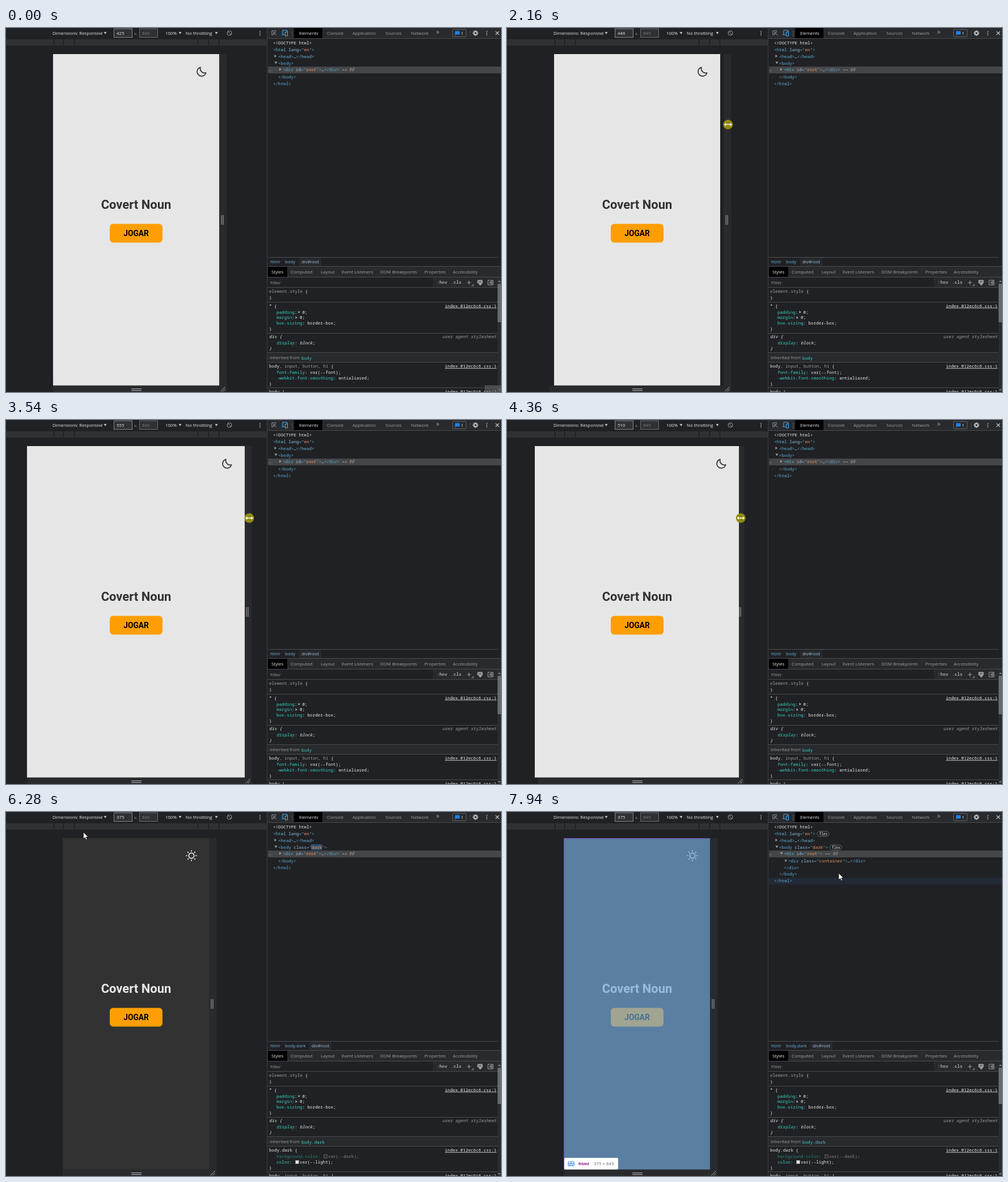
Write an HTML page that moves like this. It is 873 px wide and 642 px high and loops after 8 s.

```html
<!DOCTYPE html>
<html lang="en">
<head>
<meta charset="utf-8">
<title>Responsive preview</title>
<style>
html, body { margin: 0; width: 100%; height: 100%; overflow: hidden; background: #202124; }
svg { display: block; width: 873px; height: 642px; }
text { white-space: pre; font: 7.85px "Open Sans", sans-serif; fill: #e8eaed; }
.mono { font: 7.58px "Noto Sans Mono", monospace; }
.it { font-style: italic; }
.link { text-decoration: underline; text-anchor: end; }
.dim { fill: #9aa0a6; }
.title { font: 700 22px Roboto, sans-serif; text-anchor: middle; }
.play { font: 700 13.75px Roboto, sans-serif; text-anchor: middle; fill: #000; }
.line { fill: none; stroke: #9aa0a6; stroke-width: 1; }
.icon { fill: none; stroke-width: 20; stroke-linecap: round; stroke-linejoin: round; }
</style>
</head>
<body>
<svg id="stage" viewBox="0 0 873 642"></svg>
<script>
const COLORS = { t: '#5db0d7', n: '#9bbbdc', v: '#f29766', w: '#e8eaed', g: '#9aa0a6', p: '#35d4c7', d: '#81868a', c: '#24857e' };
const stage = document.getElementById('stage');
const esc = s => s.replace(/&/g, '&amp;').replace(/</g, '&lt;');
const rect = (x, y, w, h, fill, more = '') => `<rect x="${x}" y="${y}" width="${w}" height="${h}" fill="${fill}" ${more}/>`;
const path = (d, more = 'class="line"') => `<path d="${d}" ${more}/>`;
const text = (x, y, s, cls = '', more = '') => `<text x="${x}" y="${y + 2.8}" class="${cls}" ${more}>${esc(s)}</text>`;
const group = (id, body, more = '') => `<g id="${id}" ${more}>${body}</g>`;

// "~k" switches to the colour with key k
function code(x, y, marked, cls = '') {
  const parts = marked.split(/~(.)/);
  let spans = esc(parts[0]);
  for (let i = 1; i < parts.length; i += 2) spans += `<tspan fill="${COLORS[parts[i]]}">${esc(parts[i + 1])}</tspan>`;
  return `<text x="${x}" y="${y + 2.6}" class="mono ${cls}">${spans}</text>`;
}
const link = y => code(865, y, 'index.012ec6c6.css:1', 'link');
const down = (x, y, c = '#bdc1c6') => path(`M${x - 2.5} ${y - 2}h5l-2.5 4z`, `fill="${c}"`);
const right = (x, y, c = '#9aa0a6') => path(`M${x - 1.5} ${y - 2.5}v5l3.5-2.5z`, `fill="${c}"`);
const dots = (x, y) => [-3.2, 0, 3.2].map(d => `<circle cx="${x}" cy="${y + d}" r=".9" fill="#bdc1c6"/>`).join('');
const labels = (y, list, cls = 'dim') => list.map(([x, s]) => text(x, y, s, cls)).join('');

function emulatorBar() {
  return rect(0, 0, 461, 19, '#202124') + rect(0, 20, 460, 11, '#303134') +
    [84, 101, 120, 338, 357, 375].map(x => rect(x, 20, 1, 11, '#18191b')).join('') +
    labels(9.5, [[82, 'Dimensions: Responsive'], [281, '100%'], [317, 'No throttling']], '') +
    down(175, 9) + down(307, 9) + down(371, 9) +
    rect(190.5, 1.5, 32, 15, '#303134', 'stroke="#85888c"') + rect(235.5, 1.5, 32, 15, '#303134', 'stroke="#686b6e"') +
    text(195, 9.5, '425', '', 'id="size"') + text(226, 10, '×', 'dim') + text(240, 9.5, '849', '', 'style="fill:#777a7e"') +
    '<circle cx="394" cy="9" r="4" class="line"/>' + path('M391 6l6 6') + dots(448, 9);
}

function toolsBar() {
  const teeth = [0, 45, 90, 135].map(a => `<path d="M828 4.2v9.6" transform="rotate(${a} 828 9)" stroke="#bdc1c6" stroke-width="2"/>`).join('');
  return rect(461, 0, 412, 18, '#292a2d') + rect(508, 0, 50, 18, '#000') + rect(461, 18, 412, 1, '#494c50') +
    path('M476 6v-1h-7v7h2M472 8l5 5M472 8v4M472 8h4') +
    path('M488 12v-8h8v3M486.5 12h5M492.5 7h4v7h-4z', 'fill="none" stroke="#5db0f5"') +
    rect(504, 4, 1, 11, '#494c50') + text(517, 9.5, 'Elements') +
    labels(9.5, [[566, 'Console'], [611, 'Application'], [669, 'Sources'], [714, 'Network']]) +
    text(758.5, 8.5, '»', 'dim', 'style="font-size:12px"') +
    rect(787.5, 2.5, 24, 13, 'none', 'stroke="#5f6368" rx="1"') + path('M792 5.5h8v6h-6l-2 2z', 'fill="#1a82e8"') + text(802, 9.3, '1') +
    rect(818, 4, 1, 11, '#494c50') + teeth + '<circle cx="828" cy="9" r="2.6" fill="#292a2d" stroke="#bdc1c6" stroke-width="1.6"/>' +
    dots(848, 9) + path('M863.5 6l6 6m0-6l-6 6', 'stroke="#bdc1c6" stroke-width="1.2"');
}

function tree() {
  const pill = (x, y) => rect(x, y - 4.5, 21, 9, 'none', 'rx="4.5" stroke="#777b80" stroke-width=".8"') + code(x + 3.5, y - .3, 'flex').replace('class=', 'style="font-size:6.2px" class=');
  const darkBody = code(480, 62, '~t<body ~nclass~t="~vdark~t">');
  const closed = right(483.5, 73) + code(488, 73.7, '~t<div ~nid~t="~vroot~t">~w…~t</div>~g == ') + code(605, 73.7, '~g$0', 'it') +
    code(480, 86, '~t</body>') + code(471, 98, '~t</html>');
  return rect(462, 68, 411, 12, '#454648') +
    code(471, 26, '<!DOCTYPE html>') + code(471, 38, '~t<html ~nlang~t="~ven~t">') +
    right(475, 49.5) + code(480, 50, '~t<head>~w…~t</head>') + down(476, 61.5, '#9aa0a6') + code(463, 73, '~g…') +
    group('plainBody', code(480, 62, '~t<body>')) +
    group('darkBody', rect(538, 57, 19.5, 10, '#38638a', 'id="flash"') + darkBody) +
    group('closed', closed) +
    group('open', rect(462, 116, 411, 11.5, '#232a37', 'id="rowHover"') + pill(547, 38.5) + pill(569, 62.5) +
      down(484, 73, '#9aa0a6') + code(488, 73.7, '~t<div ~nid~t="~vroot~t">~g == ') + code(574, 73.7, '~g$0', 'it') +
      right(492, 85.5) + code(496, 86, '~t<div ~nclass~t="~vcontainer~t">~w…~t</div>') +
      code(488, 98, '~t</div>') + code(480, 109.7, '~t</body>') + code(471, 121.7, '~t</html>'));
}

function stylesPane() {
  const rule = y => rect(461, y, 406, 1, '#494c50');
  const crumbs = (body, x, w) => rect(x - 4, 405, w, 15, '#292a2d') + text(492, 412.5, body, '', 'style="fill:#6eb5e2"') + text(x, 412.5, 'div#root', '', 'style="fill:#9bc5e4"');
  const swatch = (x, y, c) => rect(x, y - 3, 6, 6, c, 'stroke="#777" stroke-width=".6"');
  const selector = '~wbody~g, input, button, h1 ~w{';
  return rule(404) + text(466, 412.5, 'html', '', 'style="fill:#6eb5e2"') +
    rect(461, 420, 412, 1, '#494c50') + rect(461, 421, 412, 18, '#292a2d') + rect(462, 421, 34, 18, '#000') + text(468, 430.5, 'Styles') +
    labels(430.5, [[502, 'Computed'], [555, 'Layout'], [592, 'Event Listeners'], [660, 'DOM Breakpoints'], [738, 'Properties'], [788, 'Accessibility']]) +
    rect(461, 439, 412, 1, '#494c50') + rect(753, 440, 114, 17, '#292a2d') + text(466, 449, 'Filter', 'dim') +
    code(760, 448.7, ':hov') + code(785, 448.7, '.cls') + path('M813 449h7m-3.5-3.5v7M821 454.5h3v-3') +
    path('M832 445h8v5h-8zM835 450v3h3v-3', 'fill="#777b80" stroke="#bdc1c6"') + path('M850 445h9v8h-9zM857 445v8M855.5 447v4l-3-2z') +
    rule(457) + code(464, 464.5, '~gelement.style ~w{') + code(464, 475.5, '}') + rule(483) +
    code(464, 490, '* {') + link(490) + code(477, 501, '~ppadding~w:  0;') + right(517, 501) +
    code(477, 510.7, '~pmargin~w:  0;') + right(512, 510.7) + code(477, 520.5, '~pbox-sizing~w: border-box;') + code(464, 530.5, '}') + rule(538) +
    code(464, 544.5, 'div {', 'it') + `<text x="865" y="547" text-anchor="end" class="mono it dim">user agent stylesheet</text>` +
    code(477, 555, '~pdisplay~w: block;', 'it') + code(464, 565, '}', 'it') + rule(572) +
    rect(461, 573, 406, 16, '#292a2d') + text(465, 581.5, 'Inherited from', 'dim') + rule(589) + link(596.5) + code(464, 627.5, '}') + rule(634) + link(641.5) +
    group('lightCss', crumbs('body', 521, 39) + code(521, 582, '~pbody') + code(464, 596.7, selector) +
      code(477, 607, '~pfont-family~w: var(--font);') + code(477, 617, '~p-webkit-font-smoothing~w: antialiased;') + code(464, 641.5, 'body {')) +
    group('darkCss', crumbs('body.dark', 539, 39) + code(521, 582, '~pbody.dark') + code(464, 596.7, 'body.dark {') +
      code(477, 607.3, '~cbackground-color~d:   var(--dark);') + swatch(560.5, 607.3, '#323232') +
      code(477, 617.3, '~pcolor~w:   var(--light);') + swatch(510.5, 617.3, '#e6e6e6') + code(464, 641.5, selector)) +
    rect(867, 440, 6, 202, '#2b2c2e') + path('M867.5 448l2.5-3 2.5 3z', 'fill="#85888c"') + path('M867.5 637l2.5 3 2.5-3z', 'fill="#85888c"') +
    rect(867, 451, 6, 68, '#69696b', 'id="thumb"') + rect(844, 630, 29, 12, '#66686b', 'id="corner" opacity=".55"');
}

const moon = 'M216.7 152.6A92 92 0 0 1 103.4 39.3A92 92 0 1 0 216.7 152.6z';
const rays = [...Array(8)].map((_, i) => `<path d="M128 38v-14" transform="rotate(${i * 45} 128 128)"/>`).join('');
const page = rect(0, 46, 0, 584.5, '#e6e6e6', 'id="sheet"') +
  group('theme', group('moon', path(moon, 'stroke="#323232"')) + group('sun', '<circle cx="128" cy="128" r="54"/>' + rays, 'stroke="#e6e6e6"'), 'class="icon"') +
  text(229.5, 316.5, 'Covert Noun', 'title', 'id="heading"') +
  rect(183, 345.5, 93, 33, '#ff9e00', 'rx="6"') + text(229.5, 364.2, 'JOGAR', 'play');
const bold = 'style="font-weight:700;fill:#1a1aa6"';
const inspect = rect(0, 46, 0, 584.5, '#6fa8dc', 'id="tint" opacity=".66"') +
  path('', 'id="dash" fill="none" stroke="#8a1fd0" stroke-dasharray="2 1.5"') +
  group('tip', rect(1, 610, 95, 20.5, '#fff', 'rx="2"') +
    group('tipDiv', text(8, 620.5, 'div#root', '', bold) + text(51, 620.5, '', '', 'id="tipSize" style="fill:#6a6d70"')) +
    group('tipHtml', path('M8 617h10v7h-10zM8 620.5h10M13 617v3.5M11 620.5v3.5M15 620.5v3.5', 'fill="none" stroke="#2f7de1"') +
      text(26, 620.5, 'html', '', 'style="font-weight:700;fill:#881280"') + text(53, 620.5, '375 × 849', '', 'style="fill:#6a6d70"')));
const cursor = group('arrow', path('M0 0v11.5l2.7-2.5 1.9 4.2 1.9-.9-1.9-4h3.7z', 'fill="#fff" stroke="#000" stroke-width=".6"')) +
  group('resize', '<circle id="press" r="8.5" fill="#8f8a0c"/>' + path('M-7 0l3.5-3v2.3h7v-2.3l3.5 3-3.5 3v-2.3h-7v2.3z', 'fill="#fff"')) +
  group('touch', '<circle r="7.7" fill="#a6a6a6"/><circle r="6.5" fill="#818181"/>');

stage.innerHTML = rect(0, 0, 873, 642, '#202124') + emulatorBar() +
  rect(0, 46, 0, 596, '#292a2d', 'id="frame"') + rect(0, 46, 0, 584.5, '#202124', 'id="hole"') +
  path('M221 636.5h18M221 639.5h18', 'stroke="#bdc1c6"') +
  group('grips', path('M4.5 330v17M7.5 330v17M3 641l8-8M7 641l4-4', 'stroke="#aeb1b5" fill="none"')) +
  page + group('inspect', inspect) + rect(460, 0, 1, 642, '#3c3d40') + rect(461, 0, 412, 642, '#202124') +
  toolsBar() + tree() + stylesPane() + group('cursor', cursor);

const el = {};
stage.querySelectorAll('[id]').forEach(node => el[node.id] = node);
const show = (id, on) => el[id].style.display = on ? '' : 'none';
const set = (id, attrs) => Object.entries(attrs).forEach(([k, v]) => el[id].setAttribute(k, v));

// [start, end, steps] of each burst of screen updates
const BURSTS = [[70, 70, 1], [400, 1140, 12], [1210, 1900, 11], [2160, 2500, 6], [2700, 3470, 12], [3540, 4310, 12],
  [4360, 5130, 12], [5210, 6000, 12], [6050, 6660, 8], [6930, 7670, 12], [7760, 7940, 4]];
const WIDTH = [[2100, 425], [2500, 568], [2700, 574], [2770, 583], [3060, 623], [3470, 557], [3540, 555], [4310, 522], [4360, 510], [4850, 375]];
const POINTER = [[400, 862, 632], [900, 560, 170], [1140, 462, 73], [1210, 448, 84], [1900, 382, 170], [2100, 382, 170], [2500, 434, 171],
  [2770, 445.5, 171], [3060, 453, 172], [3470, 430, 173], [3540, 429, 173], [4310, 417, 173], [4850, 366, 173],
  [5130, 299, 78], [5350, 327, 77], [5600, 327, 77], [6000, 200, 72], [6220, 138, 36], [6500, 43, 16], [6660, 68, 3],
  [6930, 110, 8], [7350, 465, 66], [7450, 484, 73], [7600, 484, 73], [7760, 530, 88], [7940, 585, 108]];

function settle(t) {
  let shown = 0;
  for (const [start, end, n] of BURSTS) if (t >= start) {
    const step = (end - start) / Math.max(1, n - 1);
    shown = start + (step ? Math.min(n - 1, Math.floor((t - start) / step + .001)) * step : 0);
  }
  return shown;
}

function at(keys, t, i = 1) {
  const next = keys.findIndex(k => k[0] > t);
  if (next === 0) return keys[0][i];
  if (next < 0) return keys[keys.length - 1][i];
  const a = keys[next - 1], b = keys[next];
  return a[i] + (b[i] - a[i]) * (t - a[0]) / (b[0] - a[0]);
}

function draw(time) {
  const t = settle(time), dark = t >= 5540, open = t >= 7530;
  // the page repaints one update later than the frame around it
  const width = at(WIDTH, t), half = width * .344, lagged = at(WIDTH, t - 70) * .344;
  const left = Math.floor(229.5 - lagged), pageWidth = Math.round(lagged * 2 + .3);
  const frameLeft = Math.floor(229.5 - half), frameWidth = Math.round(half * 2 + .3);
  el.size.textContent = Math.round(width);
  set('frame', { x: frameLeft, width: frameWidth + 13.5 });
  set('hole', { x: frameLeft, width: frameWidth });
  set('grips', { transform: `translate(${frameLeft + frameWidth - .5})` });
  set('sheet', { x: left, width: pageWidth, fill: dark ? '#323232' : '#e6e6e6' });
  set('theme', { transform: `translate(${left + pageWidth - 42} 66) scale(.086)` });
  el.heading.style.fill = dark ? '#e6e6e6' : '#323232';
  show('moon', !dark);
  show('sun', dark);

  const html = t >= 7800;
  show('inspect', t >= 1000 && t < 1210 || t >= 7340);
  set('tint', { x: left, width: pageWidth });
  set('tip', { transform: `translate(${left})` });
  set('dash', { d: `M${left + .5} 630V46.5H${left + pageWidth}` });
  el.tipSize.textContent = `${Math.round(width)} × 849`;
  show('dash', html);
  show('tipHtml', html);
  show('tipDiv', !html);

  show('corner', t < 70);
  show('plainBody', !dark);
  show('darkBody', dark);
  set('flash', { opacity: at([[5540, 1], [6280, .7], [6660, 0]], t) });
  show('closed', !open);
  show('open', open);
  show('rowHover', html);
  show('lightCss', !dark);
  show('darkCss', dark);
  set('thumb', { height: dark ? 64 : 68 });

  const resize = t >= 1850 && t < 4870, touch = t >= 4870 && t < 6040;
  show('cursor', t >= 400);
  set('cursor', { transform: `translate(${at(POINTER, t)} ${at(POINTER, t, 2)})` });
  show('arrow', !resize && !touch);
  show('resize', resize);
  show('press', t >= 2160);
  show('touch', touch);
}

const began = performance.now();
function tick() {
  draw((performance.now() - began) % 8000);
  requestAnimationFrame(tick);
}
tick();
</script>
</body>
</html>
```
